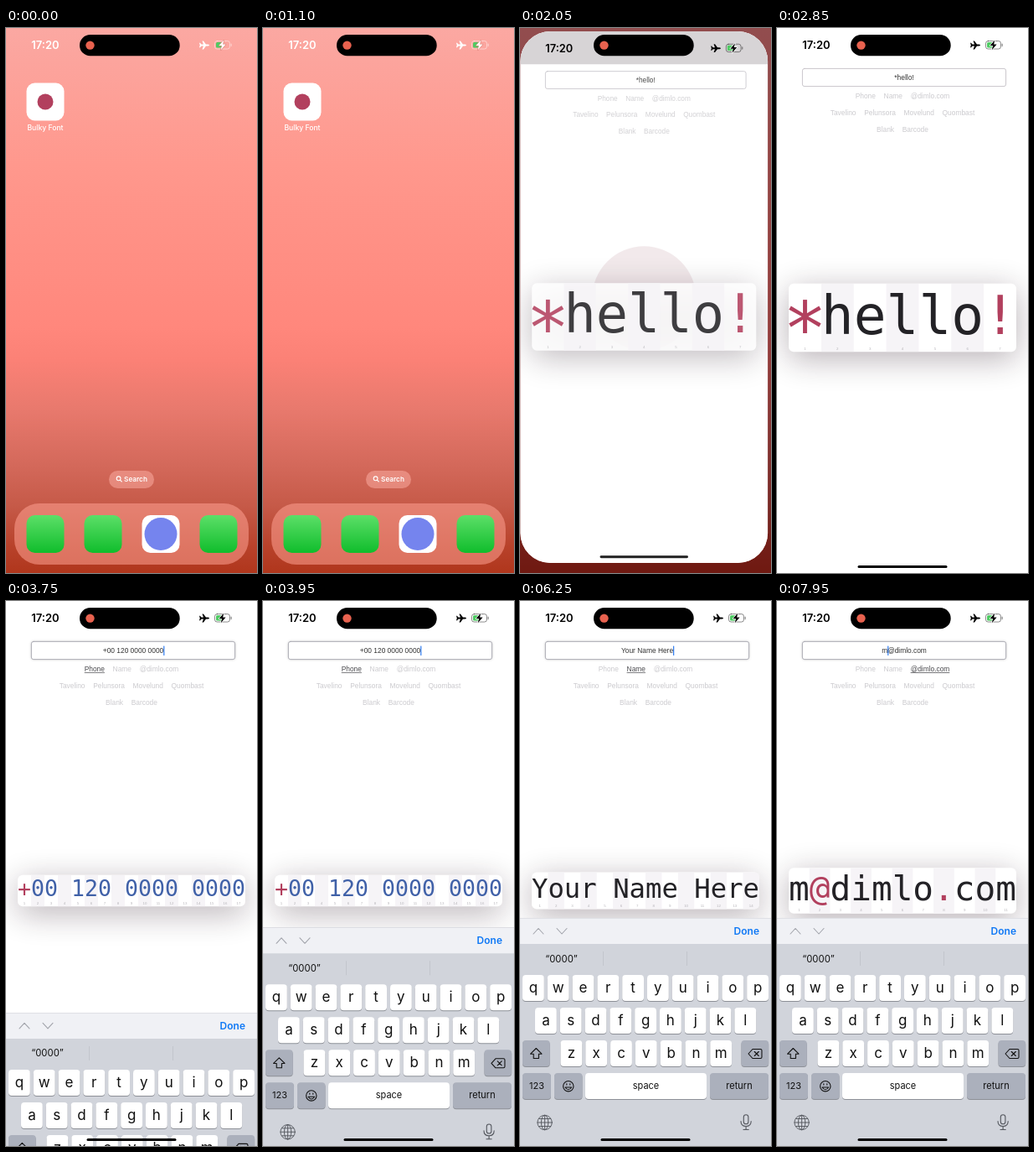
An HTML page with a canvas for the animation above (8000 ms loop, 300 by 650 pixels).

```html
<!DOCTYPE html>
<html lang="en">
<head>
<meta charset="utf-8">
<title>Big text app</title>
<style>
  html, body { margin: 0; width: 100%; height: 100%; overflow: hidden; background: #fff; }
  canvas { display: block; width: 300px; height: 650px; }
</style>
</head>
<body>
<canvas id="stage"></canvas>
<script>
const LOOP = 8000, OPEN = 1669, STRETCH = 1685, KEYBOARD = 3624;
const UI = 'Inter, sans-serif', WEB = '"Liberation Sans", Arial, sans-serif', MONO = '"DejaVu Sans Mono", monospace';
const ACCENT = '#b2405e', DOMAIN = '@dimlo.com';

const LINKS = [['Phone', 'Name', DOMAIN], ['Tavelino', 'Pelunsora', 'Movelund', 'Quombast'], ['Blank', 'Barcode']];

// What the field holds from a given time on; caret is a text index
const STATES = [
  { at: 0, value: '*hello!', caret: -1 },
  { at: 3600, value: '+00 120 0000 0000', caret: 17, link: 'Phone' },
  { at: 5800, value: 'Your Name Here', caret: 14, link: 'Name' },
  { at: 7100, value: DOMAIN, caret: 0, link: DOMAIN },
  { at: 7800, value: 'm' + DOMAIN, caret: 1, link: DOMAIN },
];

const canvas = document.getElementById('stage');
const dpr = window.devicePixelRatio || 1;
canvas.width = 300 * dpr;
canvas.height = 650 * dpr;
const c = canvas.getContext('2d');

const clamp = v => Math.max(0, Math.min(1, v));
const ramp = (t, from, to) => clamp((t - from) / (to - from));
const lerp = (a, b, p) => a + (b - a) * p;
const spring = (t, speed) => t <= 0 ? 0 : 1 - (1 + speed * t) * Math.exp(-speed * t);

function box(x, y, w, h, r, fill) {
  c.beginPath();
  c.roundRect(x, y, w, h, r);
  c.fillStyle = fill;
  c.fill();
}

function disc(x, y, r, fill) {
  c.beginPath();
  c.arc(x, y, r, 0, 7);
  c.fillStyle = fill;
  c.fill();
}

function text(str, x, y, size, family, color, align = 'center', weight = 400) {
  c.font = `${weight} ${size}px ${family}`;
  c.textAlign = align;
  c.textBaseline = 'alphabetic';
  c.fillStyle = color;
  c.fillText(str, x, y);
}

function line(d, color, width = 1) {
  c.strokeStyle = color;
  c.lineWidth = width;
  c.lineCap = c.lineJoin = 'round';
  c.stroke(new Path2D(d));
}

function shape(d, color) {
  c.fillStyle = color;
  c.fill(new Path2D(d));
}

function gradient(y0, y1, stops) {
  const g = c.createLinearGradient(0, y0, 0, y1);
  stops.forEach(([at, color]) => g.addColorStop(at, color));
  return g;
}

function faded(alpha, draw) {
  c.save();
  c.globalAlpha *= alpha;
  draw();
  c.restore();
}

function shadow(color, blur, dy) {
  c.shadowColor = color;
  c.shadowBlur = blur * dpr;
  c.shadowOffsetY = dy * dpr;
}

function statusBar(color, rim) {
  text('17:20', 47, 25, 13, UI, color, 'center', 600);
  shape('M243 20.5Q243 19.5 241 19.5H239L236 15.5H234.5L236 19.5H233.5L232 17.8H231L231.8 20.5L231 23.2H232L233.5 21.5H236L234.5 25.5H236L239 21.5H241Q243 21.5 243 20.5Z', color);
  c.beginPath();
  c.roundRect(249.5, 15.5, 18, 9.5, 2.8);
  faded(.45, () => {
    c.strokeStyle = color;
    c.lineWidth = 1;
    c.stroke();
    box(268.6, 18.6, 1.2, 3.4, .6, color);
  });
  box(251, 17, 8.5, 6.5, 1.5, '#4fcb63');
  const bolt = 'M260.3 14.6L254.6 21H258L256.8 26.2L262.6 19.4H259.2Z';
  line(bolt, rim, 1.4);
  shape(bolt, color);
}

function appIcons() {
  box(10, 567, 280, 73, 30, 'rgba(255,160,146,.55)');
  [24.5, 93.5, 162.5, 231.5].forEach((x, i) => {
    const green = gradient(581, 626, [[0, '#5cdf68'], [1, '#10bd2c']]);
    box(x, 581, 45, 45, 10, i === 2 ? '#fff' : green);
    if (i === 2) disc(x + 22.5, 603.5, 19.5, '#7584ee');
  });
  box(123, 528, 54, 21, 10.5, 'rgba(255,178,168,.5)');
  line('M137 537.3A2.4 2.4 0 1 1 132.2 537.3A2.4 2.4 0 1 1 137 537.3M136.4 539.2L138.3 541', '#fff', 1.1);
  text('Search', 155, 541, 8.2, UI, '#fff', 'center', 600);
}

function home(p) {
  c.fillStyle = gradient(0, 650, [[0, '#fba8a2'], [.25, '#ff988d'], [.55, '#ff877c'], [.61, '#fb8176'],
    [.7, '#e8796d'], [.8, '#d4695b'], [.88, '#c55947'], [.95, '#b8422b'], [1, '#b0361c']]);
  c.fillRect(0, 0, 300, 650);
  c.save();
  if (p > 0) c.filter = `blur(${5 * p * dpr}px)`;
  const zoom = 1 - .045 * p;
  c.translate(150, 325);
  c.scale(zoom, zoom);
  c.translate(-150, -325);
  appIcons();
  c.restore();
  if (p === 0) {
    box(24.5, 65.5, 45, 45, 10, '#fff');
    disc(47, 88, 9.5, ACCENT);
    text('Bulky Font', 47, 122, 8.6, UI, '#fff', 'center', 500);
  }
  faded(.55 * p, () => {
    c.fillStyle = '#3a0008';
    c.fillRect(0, 0, 300, 650);
  });
  statusBar('#fff', 'rgba(220,130,120,.8)');
}

function inputField(state, t) {
  const focused = state.caret >= 0;
  c.save();
  if (focused) shadow('rgba(0,0,0,.3)', 3, 0);
  box(30.4, 48.4, 243.2, 21.2, 2.5, '#fff');
  c.restore();
  c.strokeStyle = focused ? '#a9a9b1' : '#c3c0c6';
  c.lineWidth = .9;
  c.stroke();
  text(state.value, 152, 62, 8.4, WEB, '#333');
  if (focused && (t - state.at) % 1000 < 500) {
    const left = 152 - c.measureText(state.value).width / 2;
    box(left + c.measureText(state.value.slice(0, state.caret)).width, 53.5, 1.2, 11.5, .5, '#2f7cf0');
  }
}

function links(active) {
  c.font = `8.4px ${WEB}`;
  LINKS.forEach((row, i) => {
    const gap = 9.7, y = 84 + i * 20;
    const widths = row.map(word => c.measureText(word).width);
    let x = 150 - (widths.reduce((a, b) => a + b) + gap * (row.length - 1)) / 2;
    row.forEach((word, j) => {
      const on = word === active;
      text(word, x, y, 8.4, WEB, on ? '#4a4a4e' : '#cbcace', 'left');
      if (on) box(x, y + 1.2, widths[j], .7, 0, '#4a4a4e');
      x += widths[j] + gap;
    });
  });
}

// One column per character, scaled so the row always spans the card
function bigText(value) {
  const col = 272 / value.length, size = col / .602;
  const h = size * 1.164 + 6.5, top = 345.5 - h / 2;
  c.save();
  shadow('rgba(30,10,25,.32)', 38, 8);
  box(14, top, 272, h, 6, '#fff');
  c.restore();
  c.save();
  c.clip();
  [...value].forEach((ch, i) => {
    const x = 14 + i * col, baseline = top + size * .915 + 1;
    if (i % 2) box(x, top, col, h, 0, '#f6f4f7');
    const color = /\d/.test(ch) ? '#4061a8' : /[a-z]/i.test(ch) ? '#232226' : ACCENT;
    // The asterisk is enlarged and lowered to sit mid-line
    if (ch === '*') text(ch, x + col / 2, baseline + size * .38, size * 1.35, MONO, color);
    else text(ch, x, baseline, size, MONO, color, 'left');
    text(i + 1, x + col / 2, top + h - 2.6, 4.4, WEB, '#b5b3b8');
  });
  c.restore();
}

function key(label, x, y, w, special, size = 17) {
  box(x, y + 1, w, 31, 4, '#8d9097');
  box(x, y, w, 31, 4, special ? '#abb0bc' : '#fff');
  text(label, x + w / 2, y + 15.5 + size * .33, size, UI, '#111');
}

function keyboard(offset) {
  c.save();
  c.translate(0, offset);
  box(0, 378, 300, 272, 0, '#d1d4db');
  box(0, 378, 300, 31, 0, '#f0f1f5');
  box(0, 378, 300, .6, 0, '#cfd0d5');
  line('M16 397L22 390.5L28 397M44 390.5L50 397L56 390.5', '#a3a5ac', 1.1);
  text('Done', 286, 398, 12, UI, '#0f78f5', 'right', 600);
  text('“0000”', 49.5, 430.5, 11.3, UI, '#111');
  box(99.3, 418, .7, 17, 0, '#bcbfc7');
  box(199.3, 418, .7, 17, 0, '#bcbfc7');

  [['qwertyuiop', 3], ['asdfghjkl', 18], ['zxcvbnm', 48.5]].forEach(([row, left], r) =>
    [...row].forEach((ch, i) => key(ch, left + i * 29.8, 446 + r * 39, 25.8)));
  key('', 3, 524, 32.7, true);
  key('', 264.5, 524, 32.7, true);
  key('123', 3, 563, 34, true, 11);
  key('', 41, 563, 33.5, true);
  key('space', 78, 563, 145, false, 11);
  key('return', 227, 563, 70, true, 11);

  line('M19.3 533.5L26 540.2H22.4V545.5H16.2V540.2H12.6Z', '#111', 1.1);
  line('M273 540L278 534.5H287.5Q289 534.5 289 536V544Q289 545.5 287.5 545.5H278ZM280.3 537.5L285.3 542.5M285.3 537.5L280.3 542.5', '#111', 1.1);
  line('M64 578.7A6.2 6.2 0 1 1 51.6 578.7A6.2 6.2 0 1 1 64 578.7M54 580Q57.8 585.5 61.6 580ZM55.8 575.8V577M59.8 575.8V577', '#111', 1.1);
  line('M38.3 622A8.7 8.7 0 1 1 20.9 622A8.7 8.7 0 1 1 38.3 622M33.8 622A4.2 8.7 0 1 1 25.4 622A4.2 8.7 0 1 1 33.8 622M20.9 622H38.3M29.6 613.3V630.7M22.5 617.5H36.7M22.5 626.5H36.7', '#53565d', .9);
  line('M267.3 615.5A2.8 2.8 0 0 1 272.9 615.5V621A2.8 2.8 0 0 1 267.3 621ZM264 620.5Q264 626.5 270.1 626.5Q276.2 626.5 276.2 620.5M270.1 626.5V630.5M267 630.5H273.2', '#53565d', 1.1);
  c.restore();
}

function page(t) {
  const state = STATES.findLast(s => s.at <= t);
  box(0, 0, 300, 650, 0, '#fff');
  faded(1 - ramp(t, 2100, 2300), () => box(0, -5, 300, 45, 0, '#d2ced1'));
  inputField(state, t);
  links(state.link);
  bigText(state.value);
  if (t > KEYBOARD) keyboard(272 * (1 - ramp(t, KEYBOARD, KEYBOARD + 500)) ** 3);
}

function appWindow(t, p) {
  const settled = t > 2350;
  const grow = settled ? 1 : p, stretch = settled ? 1 : spring(t - STRETCH, .01507);
  const w = lerp(45, 300, grow), h = lerp(45, 650, stretch);
  const x = lerp(47, 150, grow) - w / 2, y = lerp(88, 325, grow) - h / 2;
  const scale = w / 300, pageAlpha = ramp(t, 1850, 2080);

  c.save();
  box(x, y, w, h, settled ? 0 : 10 + 26 * Math.sqrt(grow), '#fff');
  c.clip();
  c.translate(x, y);
  c.scale(scale, scale);
  faded(clamp(1 - grow * 2.2), () => disc(150, 150, 63, ACCENT));
  faded(ramp(t, 1740, 1860), () => disc(150, 323, 63, '#9a5062'));
  faded(pageAlpha, () => page(t));
  faded(clamp(grow * 3), () => statusBar('#000', '#fff'));
  faded(Math.max(.3, pageAlpha), () => box(96.5, h / scale - 9, 107, 3, 1.5, '#000'));
  c.restore();
}

function render(t) {
  c.setTransform(dpr, 0, 0, dpr, 0, 0);
  const p = spring(t - OPEN, .0158);
  if (t < 2400) home(p);
  if (p > 0) appWindow(t, p);
  box(88, 8, 119.7, 25.3, 12.65, '#000');
  disc(100.5, 20.6, 5.2, '#e8624f');
}

const start = performance.now();
(function frame() {
  render((performance.now() - start) % LOOP);
  requestAnimationFrame(frame);
})();
</script>
</body>
</html>
```
